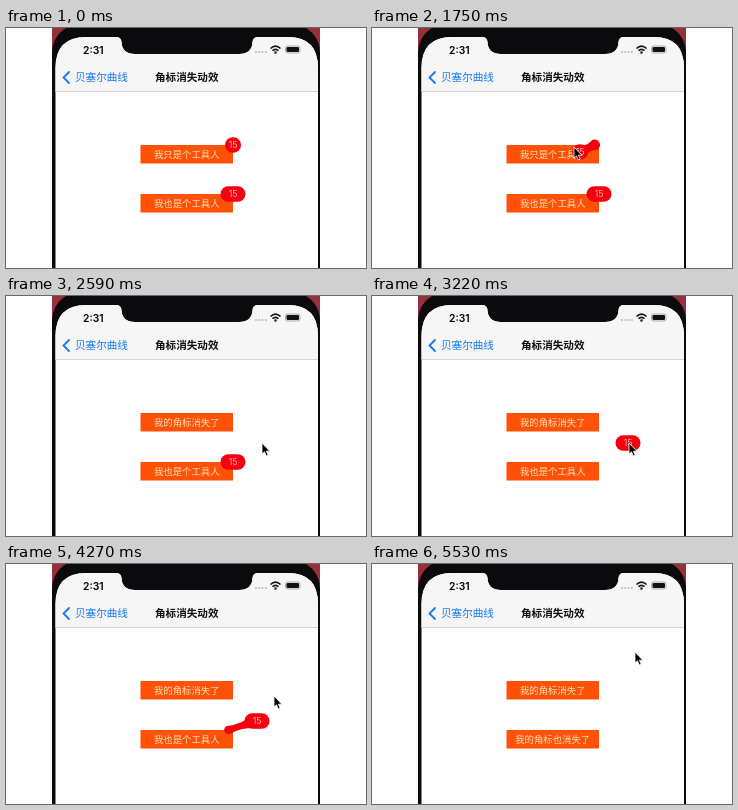
Write an HTML page that moves like this. It is 360 px wide and 240 px high and loops after 6.3 s.

```html
<!DOCTYPE html>
<html lang="zh-CN">
<head>
<meta charset="utf-8">
<style>
html, body { margin: 0; width: 100%; height: 100%; overflow: hidden; background: #fff; }
svg { display: block; width: 360px; height: 240px; font-family: "Noto Sans CJK SC", "Noto Sans CJK", sans-serif; }
.label { font-size: 9.4px; fill: #ffe2b4; text-anchor: middle; }
.count { font: 300 9px Inter, sans-serif; fill: #ffdcdc; text-anchor: middle; }
</style>
</head>
<body>
<svg viewBox="0 0 360 240">
  <rect x="46" width="268" height="24" fill="#98303a"/>
  <path d="M46 240V24Q47 8 60 0H300Q313 8 314 24V240Z" fill="#0b0b0d"/>
  <path id="screen" d="M49.5 240V40Q49.5 9 80 9H110Q115 9 115.5 14Q116 26 129 26H233Q246 26 246.5 14Q247 9 252 9H282Q312 9 312 40V240Z" fill="#fff"/>
  <clipPath id="clip"><use href="#screen"/></clipPath>
  <g clip-path="url(#clip)">
    <rect x="49" width="264" height="63" fill="#f6f6f6"/>
    <rect x="49" y="63" width="264" height="1" fill="#d4d4d4"/>
  </g>
  <text x="77" y="25.5" font-family="Inter, sans-serif" font-size="10.3" font-weight="600">2:31</text>
  <path d="M250 24H261" stroke="#bbb" stroke-width="2.2" stroke-linecap="round" stroke-dasharray="0 3.3"/>
  <g fill="none" stroke="#111" stroke-width="1.6">
    <path d="M264.5 20.5Q269.5 15.8 274.5 20.5M266.5 22.7Q269.5 20 272.5 22.7"/>
    <circle cx="269.5" cy="24.5" r=".5"/>
    <rect x="279.5" y="18" width="14.5" height="7" rx="2" stroke="#999" stroke-width=".8"/>
  </g>
  <rect x="280.5" y="19" width="12.5" height="5" rx="1.2" fill="#111"/>
  <path d="M63 44L57.5 49.5L63 55" fill="none" stroke="#1478f0" stroke-width="1.8" stroke-linecap="round"/>
  <text x="69" y="53.3" font-size="10.6" fill="#1478f0">贝塞尔曲线</text>
  <text x="149" y="53.3" font-size="10.6" font-weight="700" fill="#111">角标消失动效</text>
  <g id="buttons"></g>
  <g id="badges"></g>
  <path id="cursor" d="M0 0V11L2.5 8.8L4.3 13L6.2 12.2L4.4 8.2H7.8Z" stroke="#fff" stroke-width=".8"/>
</svg>
<script>
const LOOP = 6300, STEP = 70, LAG = 140, SNAP = 36, ANCHOR = 222.5;
const $ = id => document.getElementById(id);

// Mouse way-points: [time, x, y].
const route = [
  [210, 304, 150], [840, 225, 116], [980, 238, 110], [1120, 251, 98], [1610, 208, 124],
  [1750, 202, 119], [2100, 302, 85], [2590, 256, 147], [2870, 227, 166], [3080, 256, 147],
  [3220, 257, 147], [3500, 266, 114], [3780, 234, 184], [4130, 251, 157],
  [4270, 268, 132], [4410, 280, 90], [4760, 277, 96], [5390, 277, 96], [5530, 263, 88]
];
const badges = [
  { y: 117, width: 16, grab: 840, drop: 2310, before: '我只是个工具人', after: '我的角标消失了' },
  { y: 166, width: 25, grab: 2870, drop: 4620, before: '我也是个工具人', after: '我的角标也消失了' }
];

for (const { y, width } of badges) {
  $('buttons').innerHTML += `<rect x="134.5" y="${y}" width="92.5" height="18.5" fill="#ff5208"/>
    <text class="label" x="180.7" y="${y + 12.8}"></text>`;
  $('badges').innerHTML += `<g fill="#f5000e"><path/>
    <rect x="${-width / 2}" y="-7.8" width="${width}" height="15.6" rx="7.8"/>
    <text class="count" y="3.2">15</text></g>`;
}
const labels = document.querySelectorAll('.label');

function mouse(t) {
  const next = route.findIndex(p => p[0] > t);
  if (next < 1) return route.at(next).slice(1);
  const [t0, x0, y0] = route[next - 1], [t1, x1, y1] = route[next];
  const p = (t - t0) / (t1 - t0);
  return [x0 + (x1 - x0) * p, y0 + (y1 - y0) * p];
}

// Sticky neck from the badge centre to its anchor at (dx, dy).
function neck(dx, dy) {
  const d = Math.hypot(dx, dy);
  if (d < 6 || d > SNAP) return '';
  const r = 7 - d / 11, R = 7.5, pinch = r / 4;
  const pt = (k, side) => `${dx * k - dy / d * side} ${dy * k + dx / d * side}`;
  return `M${pt(0, R)}Q${pt(.5, pinch)} ${pt(1, r)}` +
    `A${r} ${r} 0 0 0 ${pt(1, -r)}Q${pt(.5, -pinch)} ${pt(0, -R)}Z`;
}

function draw(now) {
  const t = Math.floor(now % LOOP / STEP) * STEP;
  badges.forEach((b, i) => {
    const held = t - LAG >= b.grab, gone = t >= b.drop;
    const [x, y] = held ? mouse(t - LAG) : [227, b.y];
    const g = $('badges').children[i];
    labels[i].textContent = gone ? b.after : b.before;
    g.setAttribute('visibility', gone ? 'hidden' : 'visible');
    g.setAttribute('transform', `translate(${x} ${y})`);
    g.firstElementChild.setAttribute('d', neck(ANCHOR - x, b.y - y));
  });
  $('cursor').setAttribute('visibility', t < route[0][0] ? 'hidden' : 'visible');
  $('cursor').setAttribute('transform', `translate(${mouse(t)})`);
}

function tick() {
  draw(performance.now());
  requestAnimationFrame(tick);
}
tick();
</script>
</body>
</html>
```
